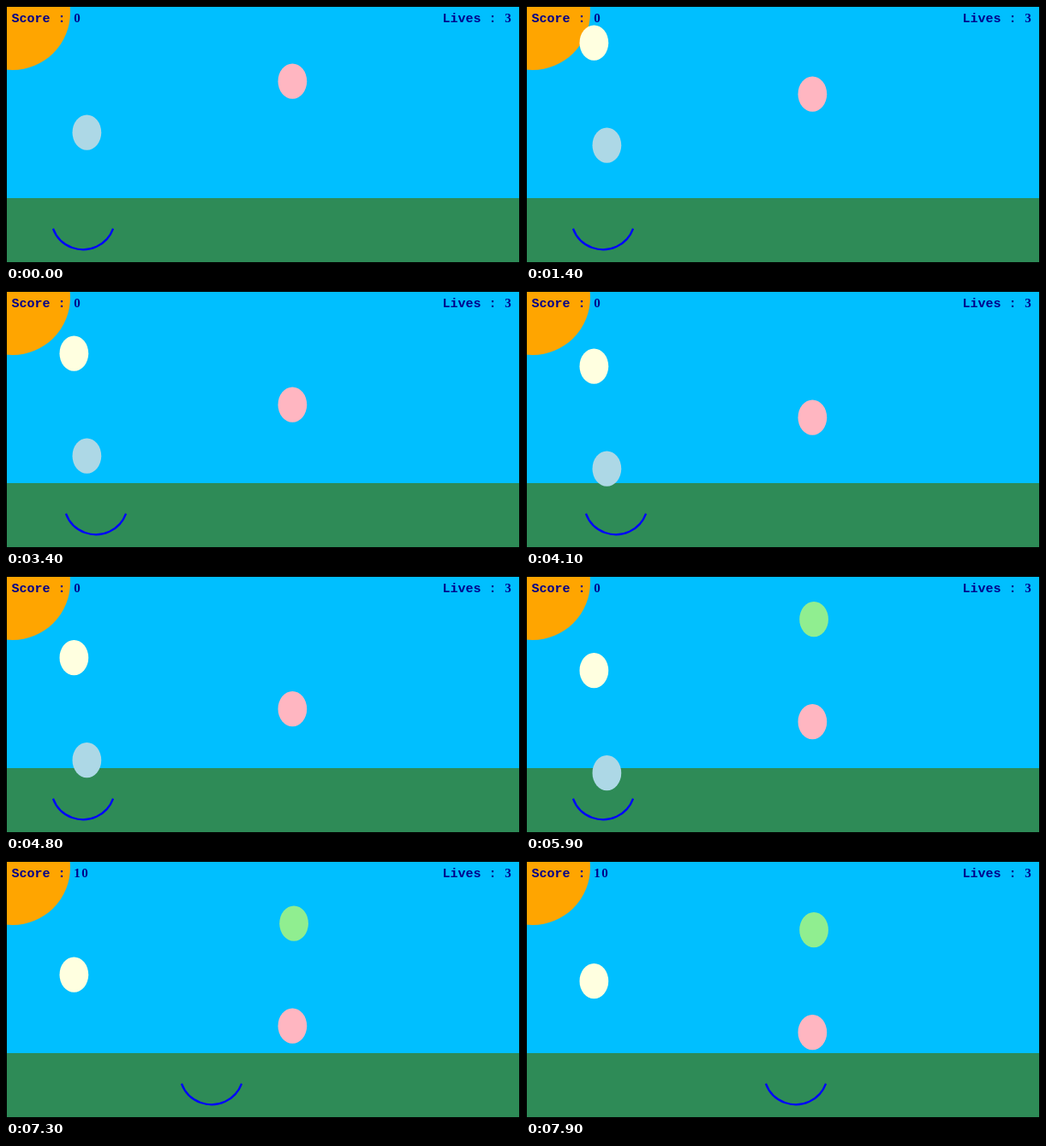
These frames come from a looping animation (600x301 px, 8 s). An HTML page with a canvas:

```html
<!DOCTYPE html>
<html lang="en">
<head>
<meta charset="utf-8">
<title>Egg catcher</title>
<style>
  html, body { margin: 0; width: 100%; height: 100%; overflow: hidden; background: #00bfff; }
  canvas { display: block; }
</style>
</head>
<body>
<canvas id="stage" width="600" height="301"></canvas>
<script>
const ctx = document.getElementById('stage').getContext('2d');
const LOOP = 8000, TICK = 100;
const FALL_TIME = 500, FALL_STEP = 7.5;
const CATCH_TIME = 6100;
const EGG = { width: 33.75, height: 41.25 };

// top is the height at the moment of birth
const eggs = [
  { color: '#add8e6', x: 77.5, top: 127.5, born: 0, gone: CATCH_TIME },
  { color: '#ffb6c1', x: 317.5, top: 67.5, born: 0, gone: LOOP },
  { color: '#ffffe0', x: 62.5, top: 22.5, born: 1000, gone: LOOP },
  { color: '#90ee90', x: 319.2, top: 22.5, born: 5000, gone: LOOP }
];

function catcherX(t) {
  const step = 15;
  let moves = 0;
  if (t >= 3300) moves++;
  if (t >= 4400) moves--;
  if (t >= 6300) moves++;
  // held key: 13 repeats at 25 per second
  moves += Math.max(0, Math.min(13, Math.floor((t - 6960) / 40) + 1));
  if (t >= 7800) moves++;
  return 90 + step * moves;
}

function ellipse(cx, cy, rx, ry, color) {
  ctx.fillStyle = color;
  ctx.beginPath();
  ctx.ellipse(cx, cy, rx, ry, 0, 0, 2 * Math.PI);
  ctx.fill();
}

function drawScene() {
  ctx.fillStyle = '#00bfff';
  ctx.fillRect(0, 0, 600, 301);
  ctx.fillStyle = '#2e8b57';
  ctx.fillRect(0, 225, 600, 76);
  ellipse(7.5, 7.5, 67.5, 67.5, '#ffa500');
}

function drawEgg(egg, t) {
  if (t < egg.born || t >= egg.gone) return;
  const y = egg.top + FALL_STEP * Math.floor((t - egg.born) / FALL_TIME);
  const rx = EGG.width / 2, ry = EGG.height / 2;
  ellipse(egg.x + rx, y + ry, rx, ry, egg.color);
}

function drawCatcher(t) {
  const tilt = Math.PI / 9;
  ctx.strokeStyle = '#0000ff';
  ctx.lineWidth = 2.25;
  ctx.beginPath();
  ctx.arc(catcherX(t), 248, 37.3, tilt, Math.PI - tilt);
  ctx.stroke();
}

function drawCounter(label, value, x) {
  const baseline = 18.5;
  ctx.fillStyle = '#00008b';
  ctx.letterSpacing = '0px';
  ctx.font = 'bold 15px "Liberation Mono", monospace';
  ctx.fillText(label + ' : ', x, baseline);
  ctx.letterSpacing = '1.5px';
  ctx.font = 'bold 15px "Liberation Serif", serif';
  ctx.fillText(value, x + 72.75, baseline);
}

function draw(now) {
  const t = Math.floor((now % LOOP) / TICK) * TICK;
  drawScene();
  eggs.forEach(egg => drawEgg(egg, t));
  drawCatcher(t);
  drawCounter('Score', t < CATCH_TIME ? 0 : 10, 6.5);
  drawCounter('Lives', 3, 509.5);
  ctx.strokeStyle = '#000';
  ctx.lineWidth = 1;
  ctx.strokeRect(0.5, 0.5, 599, 300);
  requestAnimationFrame(draw);
}

requestAnimationFrame(draw);
</script>
</body>
</html>
```
